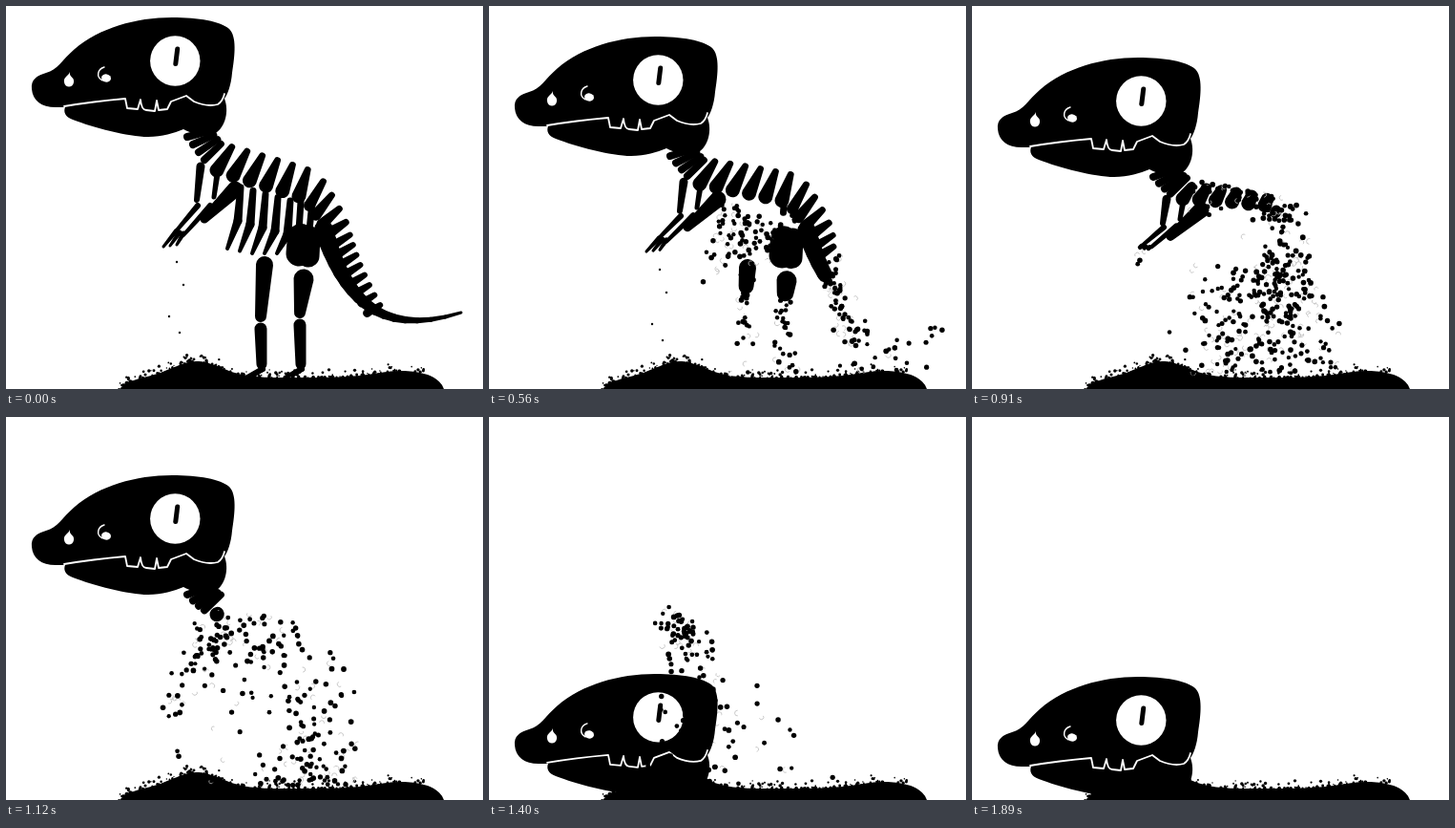
Write an HTML page with a canvas that moves like this. It is 500 px wide and 401 px high and loops after 4.89 s.

```html
<!DOCTYPE html>
<html lang="en">
<head>
<meta charset="utf-8">
<title>Crumbling skeleton</title>
<style>
html, body { margin: 0; width: 100%; height: 100%; overflow: hidden; background: #fff; }
canvas { display: block; width: 500px; height: 401px; }
</style>
</head>
<body>
<canvas id="stage" width="500" height="401"></canvas>
<script>
const W = 500, H = 401, LOOP = 4890, STEP = 70, COLLAPSE = 1190, SETTLED = 1890;
const ctx = document.getElementById('stage').getContext('2d');

const clamp = (v, lo, hi) => Math.max(lo, Math.min(hi, v));
const mix = (a, b, f) => a + (b - a) * f;

function randomizer(seed) {
  return () => {
    seed = (seed * 1664525 + 1013904223) >>> 0;
    return seed / 4294967296;
  };
}

// The head sinks gently, then drops at constant speed to the ground.
function headDrop(t) {
  if (t > COLLAPSE) return Math.min(260, 49 + (t - COLLAPSE) * .99);
  const f = clamp((t - 220) / (COLLAPSE - 220), 0, 1);
  return Math.round(49 * Math.sin(f * Math.PI / 2) ** 1.4);
}

// The neck follows the head fully, the back and arms only in part.
function sag(x, y, drop) {
  return Math.min(drop, 49) * clamp((370 - x) / 165, 0, 1) * clamp(1 - (y - 140) / 150, .25, 1);
}

const bones = [];

// A tapered bone that crumbles from its first end (time t1) to its second (t2)
function bone(x1, y1, x2, y2, w1, w2, t1, t2) {
  bones.push({ x1, y1, x2, y2, w1, w2, t1, t2 });
}

// A bone given by its base, direction and length; the tip crumbles first
function spike(x, y, angle, length, tipWidth, baseWidth, t1, t2) {
  bone(x + length * Math.cos(angle), y + length * Math.sin(angle), x, y, tipWidth, baseWidth, t1, t2);
}

function buildSpine() {
  for (let i = 0; i < 4; i++) {
    spike(190 + i * 6, 137 + i * 8, -.25 - i * .17, 24, 7, 8, 1130, 1230);
  }
  for (let i = 0; i < 6; i++) {
    spike(221 + i * 17.2, 172 + i * 5.4, -1 - i * .05, 29, 7, 15, 750 - i * 17, 1130 - i * 28);
  }
  for (let i = 0; i < 4; i++) {
    spike(318 + i * 6.7, 209 + i * 9.7, -1.05 + i * .16, 29 - i * 2.5, 7, 12, 640 - i * 15, 930 - i * 70);
  }
  for (let i = 0; i < 8; i++) {
    const t = 600 - i * 48;
    spike(347 + i * 2.9 + i * i * .23, 248 + i * 10.5, -.55, 16, 6, 9, t, t + 40);
  }
}

function buildTail() {
  const curve = (a, b, c, d, u) => mix(mix(mix(a, b, u), mix(b, c, u), u), mix(mix(b, c, u), mix(c, d, u), u), u);
  const at = u => {
    const x = curve(333, 353, 385, 477, u);
    return { x, y: curve(234, 298, 350, 321, u), w: 20 - 17 * u,
      t: 240 + (x > 398 ? (x - 398) * 2.3 : (398 - x) * 7) };
  };
  for (let i = 0; i < 16; i++) {
    const [p, q] = [at(i / 16), at((i + 1) / 16)].sort((a, b) => a.t - b.t);
    bone(p.x, p.y, q.x, q.y, p.w, q.w, p.t, q.t);
  }
}

function buildRibs() {
  for (let i = 0; i < 5; i++) {
    const x = 246 + i * 13, y = 190 + i * 3.5;
    bone(x - 14, 254 + Math.min(i, 2) * 2.5, x - 3, y + 35, 4, 9, 430, 500);
    bone(x - 3, y + 35, x, y, 9, 7, 490, 560);
  }
  for (let i = 0; i < 2; i++) {
    bone(307 + i * 11, 235, 309 + i * 12, 205, 7, 7, 500, 580);
    bone(307 + i * 10, 259 + i * 3, 309 + i * 9, 242, 27 - i * 4, 28 - i * 5, 620, 740);
  }
}

function leg(x, hip, knee, w) {
  bone(x - 4, knee, x, hip, 12, w, 400, 650);
  bone(x - 3, 375, x - 4, knee + 13, 11, 13, 220, 400);
  for (let toe = 0; toe < 2; toe++) spike(x - 2, 380, 2.7 - toe * .2, 20 - toe * 7, 3, 6, 200, 230);
}

function buildArms() {
  for (let i = 0; i < 2; i++) {
    bone(200 + i * 18, 203 - i * 3, 204 + i * 17, 168 + i * 11, 6 - i, 9 - i * 3, 1010, 1120);
    bone(178 + i * 8, 236 + i * 4, 201 + i * 13, 209, 4, 6, 900, 1020);
  }
  for (let i = 0; i < 3; i++) bone(165 + i * 7, 252 - i, 178 + i * 4, 236 + i, 3, 5, 850, 920);
  bone(208, 223, 240, 192, 9, 17, 1000, 1120);
}

buildSpine();
buildTail();
buildRibs();
leg(271, 271, 325, 18);
leg(312, 286, 321, 21);
buildArms();

const rnd = randomizer(77);

function makeGrain(x, y, born) {
  return { x, y: y + sag(x, y, headDrop(born)), born,
    vx: (rnd() - .5) * .15, vy: rnd() ** 2 * .25,
    gravity: .0004 + born * 7e-7 + rnd() * .0008,
    r: 2.1 + rnd() * .8, floor: 382 + rnd() * 7, pale: rnd() < .25, turn: rnd() * 6 };
}

function grainsOf(b) {
  const length = Math.hypot(b.x2 - b.x1, b.y2 - b.y1) + b.w1 / 2;
  return Array.from({ length: Math.ceil(length * (b.w1 + b.w2) / 44) }, () => {
    const f = rnd(), off = (rnd() - .5) * mix(b.w1, b.w2, f);
    const x = mix(b.x1, b.x2, f) + off * (b.y1 - b.y2) / length;
    const y = mix(b.y1, b.y2, f) + off * (b.x2 - b.x1) / length;
    return makeGrain(x, y, mix(b.t1, b.t2, f) + rnd() * 50);
  });
}

const neckDust = Array.from({ length: 40 }, () => {
  const depth = rnd() ** 2 * 70;
  return makeGrain(170 + depth * .4 + rnd() * 30, 125 + depth, COLLAPSE + rnd() * 70);
});
const grains = [...bones.flatMap(grainsOf), ...neckDust];

function capsule(x1, y1, x2, y2, w1, w2) {
  const a = Math.atan2(y2 - y1, x2 - x1), q = Math.PI / 2;
  ctx.beginPath();
  ctx.arc(x1, y1, w1 / 2, a + q, a + 3 * q);
  ctx.arc(x2, y2, w2 / 2, a - q, a + q);
  ctx.fill();
}

function dot(x, y, r) {
  ctx.beginPath();
  ctx.arc(x, y, r, 0, 7);
  ctx.fill();
}

function drawBody(t, drop) {
  for (const { x1, y1, x2, y2, w1, w2, t1, t2 } of bones) {
    const gone = Math.max(0, (t - t1) / (t2 - t1));
    if (gone >= 1) continue;
    const x = mix(x1, x2, gone), y = mix(y1, y2, gone);
    capsule(x, y + sag(x, y, drop), x2, y2 + sag(x2, y2, drop), mix(w1, w2, gone), w2);
  }
  if (t < 700) {
    for (const [x, y] of [[179, 268], [186, 292], [171, 325], [182, 342]]) dot(x, y + drop * .4, 1.2);
  }
}

const skull = new Path2D('M27 87C26 77 32 73 42 70C54 67 58 57 72 45C98 23 136 12 174 12' +
  'C202 12 225 16 234 24C242 32 240 51 237 70C236 83 232 93 229 97C234 110 230 126 220 133' +
  'C211 138 198 135 186 129C176 133 164 137 149 137C128 137 91 127 70 119C62 116 60 111 62 106' +
  'L52 106C37 106 28 99 27 87Z');
const mouth = new Path2D('M61 105Q91 100 125 97L127 107L138 108L141 98Q142 109 147 109L156 110' +
  'L158 99L160 109L169 108L173 100L189 94L197 100Q211 106 222 103Q227 100 229 92');
const nostril = new Path2D('M67 69C66 75 72 74 71 80C70 86 62 86 61 80C60 74 65 74 67 69Z');
const curl = new Path2D('M103 64C96 66 94 74 101 78');

function drawHead(drop) {
  ctx.save();
  ctx.translate(0, drop);
  ctx.lineCap = ctx.lineJoin = 'round';
  ctx.fill(skull);
  ctx.strokeStyle = ctx.fillStyle = '#fff';
  ctx.lineWidth = 1.8;
  ctx.stroke(mouth);
  ctx.fill(nostril);
  ctx.lineWidth = 1.4;
  ctx.stroke(curl);
  ctx.beginPath();
  ctx.ellipse(105, 75.5, 5, 4.2, .2, 0, 7);
  ctx.fill();
  dot(177.3, 57.5, 26.2);
  ctx.fillStyle = '#000';
  capsule(179.7, 45, 177.8, 60.5, 5, 5);
  ctx.restore();
}

// Flat ground with two mounds and steep ends
function soilHeight(x) {
  const mound = (center, width) => Math.exp(-(((x - center) / width) ** 2));
  return 389 - 17 * mound(200, 36) - 7 * mound(415, 40)
    + 13 * Math.exp((118 - x) / 12) + 13 * Math.exp((x - 459) / 8);
}

function drawSoil() {
  const rough = randomizer(9);
  ctx.beginPath();
  ctx.moveTo(118, H);
  for (let x = 118; x < 460; x += 3) ctx.lineTo(x, soilHeight(x));
  ctx.lineTo(459, H);
  ctx.fill();
  for (let i = 0; i < 190; i++) {
    const x = 118 + rough() * 322;
    dot(x, soilHeight(x) - rough() ** 3 * 8, .6 + rough() * 1.2);
  }
}

function drawGrains(t, pale) {
  if (t >= SETTLED) return;
  ctx.strokeStyle = '#bbb';
  ctx.lineWidth = .8;
  for (const g of grains) {
    const age = t - g.born;
    if (g.pale !== pale || age < 0) continue;
    const x = g.x + g.vx * age, y = g.y + g.vy * age + g.gravity * age * age / 2;
    if (y > g.floor) continue;
    if (pale) {
      ctx.beginPath();
      ctx.arc(x, y, g.r, g.turn, g.turn + 3.4);
      ctx.stroke();
    } else {
      dot(x, y, g.r);
    }
  }
}

function render(now) {
  const time = now % LOOP;
  const t = time < 2 * STEP ? 0 : Math.min(SETTLED, Math.floor(time / STEP) * STEP);
  const drop = headDrop(t);
  ctx.fillStyle = '#fff';
  ctx.fillRect(0, 0, W, H);
  ctx.fillStyle = '#000';
  drawSoil();
  drawBody(t, drop);
  drawGrains(t, true);
  drawHead(drop);
  drawGrains(t, false);
}

const start = performance.now();
function tick() {
  render(performance.now() - start);
  requestAnimationFrame(tick);
}
tick();
</script>
</body>
</html>
```
